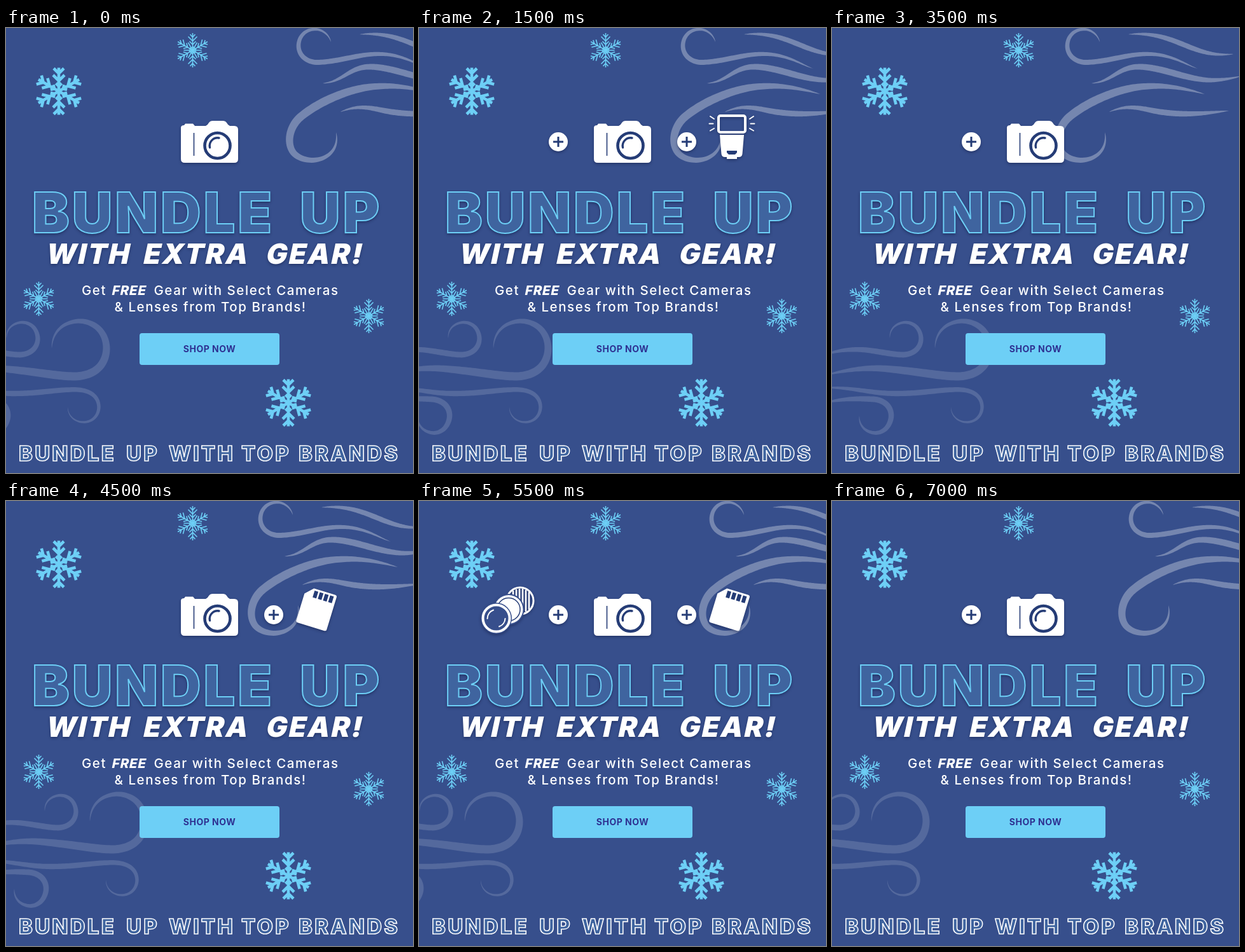
Animation of 640 by 700 pixels, one loop 7.5 s. Source, as an HTML page:

```html
<!DOCTYPE html>
<html lang="en">
<head>
<meta charset="utf-8">
<title>Bundle Up</title>
<style>
  html, body { margin: 0; width: 100%; height: 100%; overflow: hidden; background: #374f8c; }
  svg { display: block; width: 640px; height: 700px; }
  text { font-family: Inter, Montserrat, "Open Sans", sans-serif; fill: #fff; }
  .shadow { filter: drop-shadow(0 2px 2px rgba(10, 20, 60, .45)); }
  .headline text { font-size: 88px; font-weight: 900; letter-spacing: 4px; fill: #3f649f; stroke: #6dcff6; stroke-width: 2; }
  .subhead text { font-size: 44px; font-weight: 900; letter-spacing: 2.4px; }
  .copy text { font-size: 20.5px; font-weight: 450; letter-spacing: 1.55px; }
  .copy .free { font-weight: 800; letter-spacing: .9px; }
  .footer text { font-size: 33px; font-weight: 800; letter-spacing: 3.2px; fill: #3f649f; stroke: #fff; stroke-width: 1.6; }
  .button { font-size: 14px; font-weight: 700; letter-spacing: .5px; fill: #2e3192; }
  .line { fill: none; stroke: #fff; stroke-linecap: round; stroke-linejoin: round; }
  .ink { fill: none; stroke: #253c76; }
  .flake { fill: none; stroke: #6dcff6; }
</style>
</head>
<body>
<svg viewBox="0 0 640 700">
  <defs>
    <g id="boldArm"><path d="M0 0V-37M-8-36L0-28L8-36M-9-25.500L0-16.500L9-25.500M-4.500-12.500L0-8L4.500-12.500"/></g>
    <g id="fineArm"><path d="M0 0V-27M-4-25L0-20.500L4-25M-7-21.500L0-14.500L7-21.500M-5-14L0-9L5-14M0-6L4-2.300M0 0L7-12.200"/></g>
    <g id="plus">
      <circle r="15" fill="#fff"/>
      <path class="ink" stroke-width="3" d="M-8 0H8M0-8V8"/>
    </g>
  </defs>
  <rect width="640" height="700" fill="#374f8c"/>
  <g id="flakes"></g>
  <g id="windTop" fill="#fff" opacity=".31"></g>
  <g id="windBottom" fill="#fff" opacity=".145"></g>

  <g class="shadow">
    <path fill="#fff" d="M275 157Q275 153 280 153L282 150.500H294L297 154H314Q317 153 319 149Q321 146 325 146H341Q345 146 347 149Q349 153 352 154H359Q365 154 365 160V206Q365 212 359 212H281Q275 212 275 206Z"/>
    <path class="ink" stroke-width="1.600" d="M295.500 165V201"/>
    <circle class="ink" cx="332.500" cy="185" r="20" stroke-width="4.600"/>
    <path class="ink" stroke-width="3.400" stroke-linecap="round" d="M320.500 188A12.500 12.500 0 0 1 335 173"/>
  </g>

  <g id="plusLeft" class="shadow"><use href="#plus" x="219" y="179"/></g>
  <g id="plusRight" class="shadow"><use href="#plus" x="421" y="179"/></g>

  <g id="flash" class="shadow">
    <rect class="line" x="471" y="138" width="42" height="26" rx="3" stroke-width="4"/>
    <path class="line" stroke-width="2" d="M458 139L464 143M456.500 150.500H462.500M458 161.500L464 158M526 139L520 143M527.500 150.500H521.500M526 161.500L520 158"/>
    <path fill="#fff" d="M473 168H511L508.500 198Q508 203 503 203H500V206H484V203H481Q476 203 475.500 198Z"/>
    <path fill="#253c76" d="M484 193H500V196L497 199H487L484 196Z"/>
  </g>

  <g id="tripod" class="shadow">
    <path fill="#fff" d="M136 130H154V136H136ZM141 138H149V150H141ZM137 151H153L155 158H135Z"/>
    <path class="line" stroke-width="2.400" d="M149 137L157 140M145 136V210M137 157L117 210M153 157L173 210"/>
    <path class="line" stroke-width="4.600" d="M158 140L166 143M145 160V187M136 160L126 187M154 160L164 187"/>
    <path class="line" stroke-width="4" d="M145 209V210M117 209L116.500 210M173 209L173.500 210"/>
  </g>

  <g id="card" class="shadow">
    <g transform="translate(488 170) rotate(17)">
      <path fill="#fff" d="M-13-30H22Q25-30 25-27V26Q25 29 22 29H-22Q-25 29-25 26V-18Z"/>
      <path class="ink" stroke-width="6" d="M-8-27V-16M.500-27V-16M9-27V-16M17.500-27V-16"/>
    </g>
  </g>

  <g id="filters" class="shadow">
    <circle class="line" cx="159" cy="157" r="21" stroke-width="3"/>
    <path class="line" stroke-width="2.600" d="M148 142V172M153 140V174M158 139V175M163 139V175M168 141V173M173 144V170"/>
    <circle cx="141" cy="170.500" r="24.500" fill="#374f8c"/>
    <circle cx="141" cy="170.500" r="22.500" fill="#fff"/>
    <circle class="ink" cx="141" cy="170.500" r="18" stroke-width="1.500"/>
    <circle cx="121.500" cy="184.500" r="24.500" fill="#374f8c"/>
    <circle class="line" cx="121.500" cy="184.500" r="21" stroke-width="4"/>
    <path class="line" stroke-width="2" d="M107.500 185A14 14 0 0 1 117 171.500M135.500 185A14 14 0 0 1 126 197.500"/>
  </g>

  <g class="headline shadow">
    <text x="41" y="322">BUNDLE</text><text x="462" y="322">UP</text>
  </g>
  <g class="subhead shadow">
    <text transform="translate(61 371) skewX(-12)">WITH</text>
    <text transform="translate(214 371) skewX(-12)">EXTRA</text>
    <text transform="translate(407 371) skewX(-12)">GEAR!</text>
  </g>
  <g class="copy">
    <text x="119" y="420">Get</text>
    <text class="free" transform="translate(165.500 420) skewX(-12)">FREE</text>
    <text x="232.500" y="420">Gear with Select Cameras</text>
    <text x="321.500" y="446" text-anchor="middle">&amp; Lenses from Top Brands!</text>
  </g>
  <rect x="210" y="480" width="220" height="50" rx="4" fill="#6dcff6"/>
  <text class="button" x="320" y="510" text-anchor="middle">SHOP NOW</text>
  <g class="footer">
    <text x="20" y="681">BUNDLE</text><text x="189" y="681">UP</text><text x="256" y="681">WITH</text>
    <text x="370" y="681">TOP</text><text x="460" y="681">BRANDS</text>
  </g>
</svg>
<script>
const NS = 'http://www.w3.org/2000/svg';
const $ = id => document.getElementById(id);
const add = (parent, tag, attrs) => {
  const node = document.createElementNS(NS, tag);
  for (const key in attrs) node.setAttribute(key, attrs[key]);
  return parent.appendChild(node);
};

function flake(x, y, arm, width) {
  const g = add($('flakes'), 'g', { class: 'flake', transform: `translate(${x} ${y})`, 'stroke-width': width });
  for (let a = 0; a < 360; a += 60) add(g, 'use', { href: '#' + arm, transform: `rotate(${a})` });
}
flake(83, 99.5, 'boldArm', 4.6);
flake(444, 589.5, 'boldArm', 4.6);
flake(293.5, 35, 'fineArm', 1.6);
flake(51.5, 426, 'fineArm', 1.6);
flake(570.5, 453, 'fineArm', 1.6);

// Turns a centre line into a band that tapers at both ends; skew moves the widest point.
function ribbon(group, width, skew, d) {
  const path = add($(group), 'path', { d });
  const length = path.getTotalLength(), steps = 120, left = [], right = [];
  for (let i = 0; i <= steps; i++) {
    const t = i / steps, s = t * length;
    const p = path.getPointAtLength(s);
    const a = path.getPointAtLength(Math.max(0, s - 0.5));
    const b = path.getPointAtLength(Math.min(length, s + 0.5));
    const angle = Math.atan2(b.y - a.y, b.x - a.x);
    const half = width / 2 * Math.max(0, Math.sin(Math.PI * t ** skew)) ** 0.75;
    const dx = -Math.sin(angle) * half, dy = Math.cos(angle) * half;
    left.push(`${p.x + dx} ${p.y + dy}`);
    right.unshift(`${p.x - dx} ${p.y - dy}`);
  }
  path.setAttribute('d', 'M' + left.concat(right).join('L') + 'Z');
}
ribbon('windTop', 8, 0.9, 'M421 22C418 10 407 2 396 2C380 2 370 14 370 28C370 43 383 55 402 54C440 52 465 40 500 41C535 42 555 57 575 64');
ribbon('windTop', 8, 1, 'M466 10C505 7 528 16 555 27S600 44 631 41');
ribbon('windTop', 10, 1, 'M408 87C440 85 450 61 482 61C520 61 560 83 600 82Q625 81 645 75');
ribbon('windTop', 13, 1, 'M586 104C545 92 520 90 490 92C450 95 405 115 378 136C352 154 350 188 366 200C390 218 437 205 429 164');
ribbon('windTop', 9, 1, 'M436 132C455 124 470 123 495 128C540 138 575 136 624 130');
ribbon('windBottom', 9, 0.8, 'M-12 514C15 505 40 504 65 508C85 511 100 514 112 514C130 513 140 502 140 488C139 472 128 463 115 463C100 464 90 474 91 488');
ribbon('windBottom', 13, 0.9, 'M-10 546C30 536 60 533 95 537C140 541 170 548 200 548C235 546 248 525 248 503C247 475 226 461 205 461C180 462 162 478 162 504');
ribbon('windBottom', 8.5, 0.8, 'M-14 566C30 564 60 575 100 575C140 575 160 570 190 569C215 567 236 575 236 597C235 612 224 620 212 620C198 620 187 610 187 596');
ribbon('windBottom', 9, 0.9, 'M-14 590C20 582 45 583 66 584C85 586 94 598 93 612C91 628 80 637 68 637C52 636 42 625 43 610');

const STEP = 500;
const drift = [0, 15, 30, 45, 60, 75, 90, 90, 75, 60, 15, 0, -10, -20, -10];
// Steps during which each item is shown, end exclusive.
const shown = {
  plusRight: [[1, 6], [8, 13]],
  plusLeft: [[3, 8], [10, 15]],
  flash: [[2, 5]],
  tripod: [[4, 7]],
  card: [[9, 12]],
  filters: [[11, 14]]
};

function draw(time) {
  const step = Math.floor(time / STEP) % drift.length;
  const shift = 90 - drift[step];
  $('windTop').setAttribute('transform', `translate(${shift} 0)`);
  $('windBottom').setAttribute('transform', `translate(${-shift} 0)`);
  for (const id in shown) {
    const on = shown[id].some(([from, to]) => step >= from && step < to);
    $(id).setAttribute('visibility', on ? 'visible' : 'hidden');
  }
}

const start = performance.now();
function tick() {
  draw(performance.now() - start);
  requestAnimationFrame(tick);
}
tick();
</script>
</body>
</html>
```
